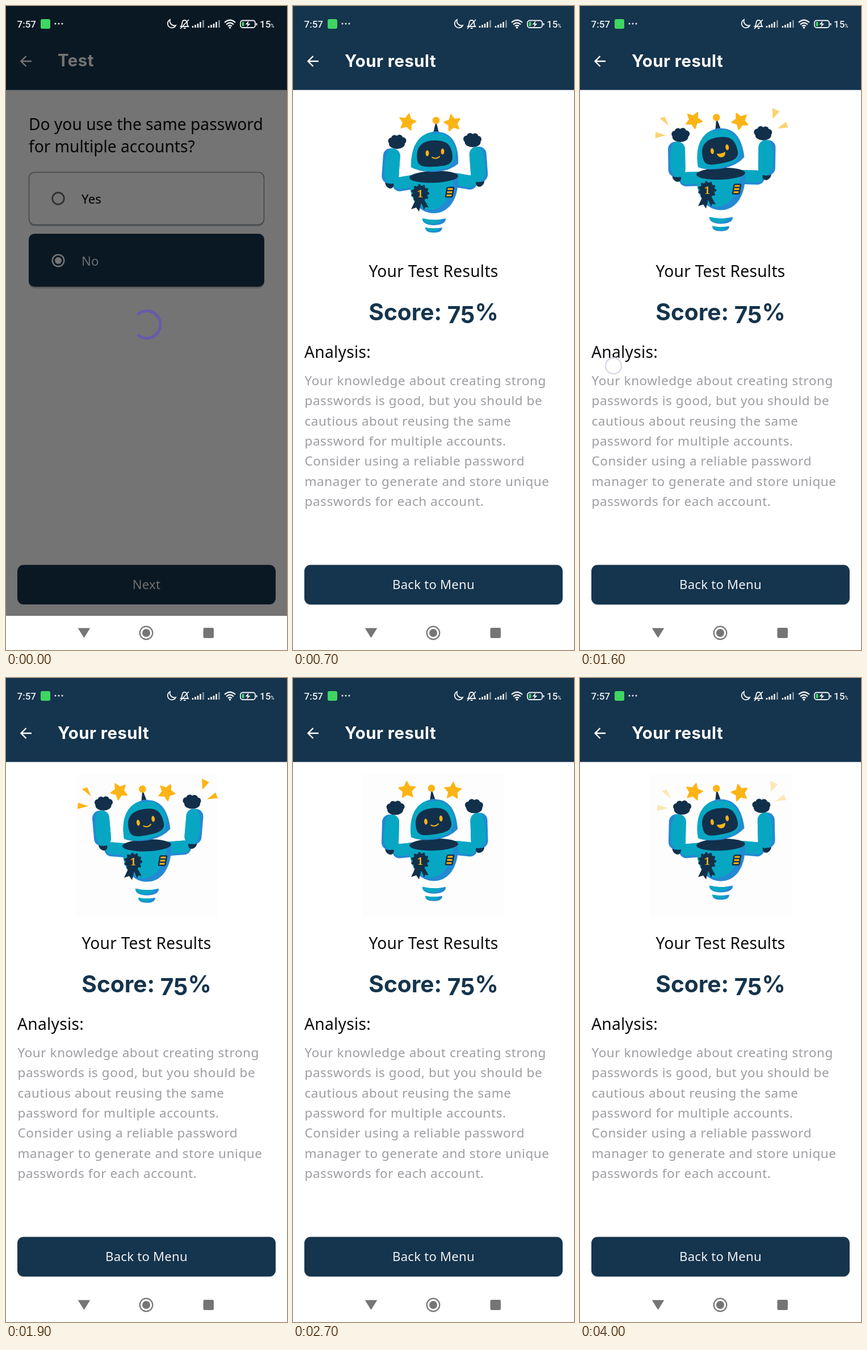
Write an HTML page that moves like this. It is 495x1131 px and loops after 4100 ms.

```html
<!DOCTYPE html>
<html lang="en">
<head>
<meta charset="utf-8">
<title>Test result</title>
<style>
  html, body { margin: 0; width: 100%; height: 100%; overflow: hidden; background: #fff; }
  svg { display: block; width: 495px; height: 1131px; }
  text { font-family: "Noto Sans", sans-serif; white-space: pre; }
  .title { font: 700 29.3px Inter, sans-serif; letter-spacing: .5px; fill: #fff; }
  .score { font: 700 40.7px Inter, sans-serif; fill: #15344d; }
  .head { font-size: 28.2px; fill: #0b0b0b; }
  .wide { letter-spacing: .25px; }
  .body { font-size: 22.5px; letter-spacing: .56px; fill: #9d9da3; }
  .label { font-size: 22.2px; letter-spacing: .2px; }
  .clock { font: 500 17px Roboto, sans-serif; fill: #eef1f3; }
  .mid { text-anchor: middle; }
  .navy { fill: #15344d; }
  .ink { fill: #12304b; }
  .cyan { fill: #07a7c3; }
  .blue { fill: #2389d3; }
  .gold { fill: #fcb415; }
</style>
</head>
<body>
<svg viewBox="0 0 495 1131">
  <defs>
    <clipPath id="screen"><rect width="495" height="1071"/></clipPath>
    <g id="back" fill="none" stroke="#fff" stroke-width="2.4">
      <path d="M45 97H27M35.5 88L26.5 97L35.5 106"/>
    </g>
    <path id="star" class="gold" stroke="#fcb415" stroke-width="2" stroke-linejoin="round"/>
    <g id="bars" stroke-width="2.6">
      <path d="M1 38v-3M5.5 38v-5M10 38v-7M14.5 38v-10" stroke="#eef1f3"/>
      <path d="M19.5 38v-13" stroke="#8796a3"/>
    </g>
    <g id="arm">
      <path class="upLow" stroke="#2389d3" stroke-width="25" stroke-linecap="round"/>
      <path class="upTop" stroke="#07a7c3" stroke-width="21" stroke-linecap="round"/>
      <g class="fore">
        <ellipse class="ink" cx="172" cy="312" rx="7" ry="9" transform="rotate(-35 172 312)"/>
        <rect class="blue" x="157.5" y="250" width="30" height="62" rx="13"/>
        <path class="cyan" d="M170 250Q187.500 249 187.500 265V297Q187.500 312 174 312Q162 310 161.500 290Q161 258 170 250Z"/>
      </g>
      <g class="hand ink">
        <ellipse cx="183" cy="242" rx="14" ry="9"/>
        <circle cx="173.5" cy="237" r="6"/><circle cx="179" cy="232.5" r="6"/>
        <circle cx="187.5" cy="232" r="6"/><circle cx="193.5" cy="236.5" r="6"/>
      </g>
    </g>
  </defs>

  <rect width="495" height="1131" fill="#fff"/>

  <g clip-path="url(#screen)">
    <g id="quiz">
      <rect width="495" height="1071" fill="#fff"/>
      <rect class="navy" width="495" height="147.5"/>
      <use href="#back"/>
      <text class="title" x="91" y="106">Test</text>
      <text class="head" x="40" y="218">Do you use the same password</text>
      <text class="head" x="40" y="257">for multiple accounts?</text>
      <rect x="40" y="294" width="415" height="93" rx="11" fill="#c9cdd1"/>
      <rect x="40.5" y="292" width="414" height="92" rx="10" fill="#fff" stroke="#96a1aa" stroke-width="1.6"/>
      <circle cx="92" cy="338" r="10.3" fill="none" stroke="#6d6d6d" stroke-width="2.8"/>
      <text class="label" x="133" y="347">Yes</text>
      <rect x="40" y="403" width="415" height="93" rx="11" fill="#c9cdd1"/>
      <rect class="navy" x="40" y="400" width="415" height="93" rx="10"/>
      <circle cx="92" cy="447" r="10.3" fill="none" stroke="#fff" stroke-width="2.4"/>
      <circle cx="92" cy="447" r="6" fill="#fff"/>
      <text class="label" x="133" y="456" fill="#f1f3f5">No</text>
      <rect class="navy" x="20" y="981.5" width="455" height="69.5" rx="11"/>
      <text class="label mid" x="247.5" y="1024" fill="#f1f3f5">Next</text>
    </g>
    <rect id="dim" width="495" height="1071" opacity=".545"/>
    <path id="spin" fill="none" stroke="#665ca8" stroke-width="5.2"/>

    <g id="result">
      <rect width="495" height="1071" fill="#fff"/>
      <rect class="navy" width="495" height="147.5"/>
      <use href="#back"/>
      <text class="title" x="91" y="106.5">Your result</text>
      <text class="head wide mid" x="247.5" y="476">Your Test Results</text>
      <text class="score mid" x="247.5" y="552">Score: <tspan dy="5">75</tspan><tspan dy="-5">%</tspan></text>
      <text class="head wide" x="20" y="617.5">Analysis:</text>
      <g id="lines"></g>
      <rect x="20" y="983.5" width="455" height="69" rx="11" fill="#cdd2d6"/>
      <rect class="navy" x="20" y="981.5" width="455" height="69.5" rx="11"/>
      <text class="label mid" x="247.5" y="1024" fill="#eef1f3">Back to Menu</text>
    </g>

    <g id="robot">
      <rect id="card" x="122" y="168" width="251" height="252" fill="#fdfdfd"/>
      <g id="rayL" class="gold"><path d="M134 195L143 192L150 208ZM127 219L145 225L126 230Z"/></g>
      <g id="rayR" class="gold"><path d="M345 177L358 183L346 196ZM369 201L373 211L354 213Z"/></g>
      <use id="starL" href="#star"/>
      <use id="starR" href="#star"/>
      <use href="#arm"/>
      <use href="#arm" transform="translate(499.5 -3) scale(-1 1)"/>
      <g id="springs">
        <path class="blue" d="M228 373Q248 378 269 373Q270 384 248 385Q227 384 228 373Z"/>
        <path class="cyan" d="M228 373Q245 377 261 375Q260 382 243 383Q229 381 228 373Z"/>
        <path class="blue" d="M233 389Q248 392 263 389Q263 398 248 398Q233 398 233 389Z"/>
        <path class="cyan" d="M233 389Q246 392 257 390Q256 396 245 396Q234 395 233 389Z"/>
      </g>
      <g id="torso">
        <path class="blue" d="M205 300C204 343 224 364 248 364S292 343 291 300Z"/>
        <path class="cyan" d="M205 300C204 339 221 357 243 358Q276 354 283 304Z"/>
        <ellipse class="ink" cx="248" cy="300" rx="43" ry="10.5" transform="rotate(-2 248 300)"/>
        <path class="ink" d="M217 338L208 357L217 354L222 361L226 346L231 358L233 353L239 354L230 338Z"/>
        <circle class="ink" cx="224" cy="329" r="13.5"/>
        <circle cx="224" cy="329" r="14" fill="none" stroke="#12304b" stroke-width="4.5" stroke-dasharray="0 8" stroke-linecap="round"/>
        <text class="gold mid" x="224" y="335.5" style="font: 700 18px 'Noto Serif', serif">1</text>
        <g transform="translate(276 327) skewX(-10)">
          <rect class="ink" x="-7" y="-9.5" width="14" height="19" rx="2.5"/>
          <path d="M-4.5 -5.5H4.5M-4.5 0H4.5M-4.5 5.5H4.5" stroke="#fcb415" stroke-width="3"/>
        </g>
      </g>
      <g id="head">
        <path class="ink" d="M247 223L251 206H253L257 223Z"/>
        <circle class="gold" cx="252" cy="201" r="6.3"/>
        <path class="blue" d="M208 283C207 249 221 221 252 221S292 247 291 277Q272 293 240 291Q220 290 208 283Z"/>
        <path class="cyan" d="M208 283C207 249 221 221 252 221Q279 225 286 252Q289 274 272 284Q250 291 230 289Q216 287 208 283Z"/>
        <path class="blue" d="M241 224Q252 216 263 224Z"/>
        <path class="ink" d="M219 271C215 247 228 236 249 236S279 242 281 264C282 279 268 281 251 282S221 283 219 271Z"/>
        <ellipse class="gold" cx="236.5" cy="258.5" rx="2.9" ry="5.2"/>
        <ellipse class="gold" cx="263.5" cy="255.5" rx="2.9" ry="5.2"/>
        <path id="smile" d="M245 265.5Q252 270 258 264.5" fill="none" stroke="#fcb415" stroke-width="2" stroke-linecap="round"/>
        <path id="grin" class="gold" d="M243.5 264Q252 266 259 262.5Q258.5 271.5 252 271.5Q245.5 271.5 243.5 264Z"/>
      </g>
    </g>
    <circle id="touch" cx="59" cy="632" r="14" fill="#fff" fill-opacity=".65" stroke="#d9d9e8" stroke-width="2.4"/>
  </g>

  <g id="status">
    <text class="clock" x="19.5" y="38">7:57</text>
    <rect x="61" y="23" width="17" height="17" rx="3" fill="#3fd661"/>
    <g fill="#eef1f3"><circle cx="87" cy="31" r="1.5"/><circle cx="93" cy="31" r="1.5"/><circle cx="99" cy="31" r="1.5"/></g>
    <g fill="none" stroke="#eef1f3" stroke-width="1.8">
      <path d="M289 24A7.5 7.5 0 1 0 299 34A8 8 0 0 1 289 24Z"/>
      <path d="M308 36H321Q319 34 319 29Q318 25 314.5 25Q311 25 310.5 29Q310 34 308 36ZM313 39H316.5M307 40L322 24"/>
      <path d="M385 29Q394.5 20.5 404 29M388 32.5Q394.5 26.5 401 32.5M391 35.5Q394.5 32.5 398 35.5" stroke-width="2.2"/>
      <rect x="413" y="25.5" width="26" height="12.5" rx="4"/>
      <path d="M441.5 30V34" stroke-width="2"/>
    </g>
    <circle cx="394.5" cy="38" r="1.8" fill="#eef1f3"/>
    <rect x="415.5" y="28" width="4" height="7.5" rx="1" fill="#42d25f"/>
    <path d="M427.5 26L421.5 32.5H425.5L424 37.5L430.5 31H426.5Z" fill="#eef1f3"/>
    <use href="#bars" x="328"/><use href="#bars" x="356"/>
    <text class="clock" x="447" y="38">15<tspan font-size="8.5">%</tspan></text>
  </g>

  <g fill="#757575">
    <path d="M127.5 1093H147.5L137.5 1109Z" stroke="#757575" stroke-linejoin="round"/>
    <circle cx="247" cy="1101" r="11.3" fill="none" stroke="#757575" stroke-width="2.2"/>
    <circle cx="247" cy="1101" r="7"/>
    <rect x="347.5" y="1092" width="18.5" height="18" rx="2.5"/>
  </g>
</svg>
<script>
const LOOP = 4100, STEP = 100;
const $ = id => document.getElementById(id);
const set = (el, attrs) => { for (const k in attrs) el.setAttribute(k, attrs[k]); };
const each = (cls, attrs) => document.querySelectorAll(cls).forEach(el => set(el, attrs));
const show = (id, on) => set($(id), { visibility: on ? 'visible' : 'hidden' });

// Linear interpolation through [time, value] pairs
function key(t, ...pts) {
  if (t <= pts[0][0]) return pts[0][1];
  for (let i = 1; i < pts.length; i++) {
    const [t0, a] = pts[i - 1], [t1, b] = pts[i];
    if (t <= t1) return a + (b - a) * (t - t0) / (t1 - t0);
  }
  return pts[pts.length - 1][1];
}

const zoom = s => `translate(247.5 535.5) scale(${s}) translate(-247.5 -535.5)`;
const move = (x, y) => `translate(${x} ${y})`;

$('lines').innerHTML = [
  'Your knowledge about creating strong',
  'passwords is good, but you should be',
  'cautious about reusing the same',
  'password for multiple accounts.',
  'Consider using a reliable password',
  'manager to generate and store unique',
  'passwords for each account.'
].map((s, i) => `<text class="body" x="20.5" y="${666 + i * 35.35}">${s}</text>`).join('');

const starPts = Array.from({ length: 10 }, (_, i) => {
  const r = i % 2 ? 7.5 : 15, a = i * Math.PI / 5;
  return `${(r * Math.sin(a)).toFixed(2)} ${(-r * Math.cos(a)).toFixed(2)}`;
});
set($('star'), { d: `M${starPts.join('L')}Z` });

function drawPages(t) {
  const p = key(t, [200, 0], [300, .4], [400, .76], [500, .94], [600, 1]);
  set($('quiz'), { transform: zoom(1 + .05 * p) });
  set($('result'), { transform: zoom(.85 + .15 * p), opacity: key(t, [200, 0], [300, .6], [400, 1]) });
  const g = Math.round(key(t, [200, 0], [400, 128]));
  set($('dim'), { fill: `rgb(${g},${g},${g + g / 32})` });

  const turn = t / 100 * .9, from = -2.35 + turn, to = 2.3 + turn;
  const at = a => `${248 + 24 * Math.cos(a)} ${559.5 + 24 * Math.sin(a)}`;
  set($('spin'), {
    d: `M${at(from)}A24 24 0 1 1 ${at(to)}`,
    opacity: key(t, [100, 1], [200, .7], [300, 0])
  });
}

function drawRobot(t) {
  const arm = key(t, [1350, 0], [1600, .55], [1850, 1], [2400, 1], [2800, 0], [3800, 0], [4000, .3]);
  const lift = key(t, [700, 0], [1600, -5.5], [2300, -7], [3200, -8], [4000, -7.3]);
  const tilt = key(t, [1100, 0], [1450, -8], [2500, -8], [2900, -3], [3600, -3], [3850, -8]);
  const coil = key(t, [700, 0], [1600, -2.5], [2300, -4], [3200, -9], [4000, -8.5]);
  const starY = key(t, [700, 204], [1600, 200.5], [2300, 197], [3200, 196.5], [4000, 200]);
  const spin = key(t, [700, 12], [1600, 27], [2300, 66], [3200, 72], [4000, 86]);
  const ray = key(t, [1500, 0], [1600, .6], [1700, 1], [2400, 1], [2600, 0], [3900, 0], [4000, .32]);
  const grin = t >= 1000 && t < 1900 || t >= 2900;

  set($('torso'), { transform: move(0, lift) });
  set($('springs'), { transform: move(0, coil) });
  set($('head'), { transform: `${move(0, lift)} rotate(${tilt} 248 285)` });
  show('grin', grin);
  show('smile', !grin);

  const ex = 188 - 2 * arm, ey = 313 + lift - 6 * arm, sy = 309 + lift;
  each('.upLow', { d: `M${ex} ${ey}L212 ${sy}` });
  each('.upTop', { d: `M${ex} ${ey - 2}L212 ${sy - 2}` });
  each('.fore', { transform: `${move(-4 * arm, lift - 11 * arm)} rotate(${4 - 9 * arm} 172 281)` });
  each('.hand', { transform: move(-11.5 * arm, lift - 12 * arm) });

  set($('starL'), { transform: `${move(201.5 - 2 * arm, starY)} rotate(${spin})` });
  set($('starR'), { transform: `${move(281 + 2 * arm, starY + 1.5)} rotate(${-spin})` });
  const inset = 14 * (1 - arm), drop = 5 * (1 - arm);
  set($('rayL'), { transform: move(inset, drop), opacity: ray });
  set($('rayR'), { transform: move(-inset, drop), opacity: ray });
  show('card', t >= 1700);
}

function frame(now) {
  const t = Math.floor(now % LOOP / STEP) * STEP;
  drawPages(t);
  drawRobot(t);
  set($('robot'), { display: t >= 600 ? 'inline' : 'none' });
  set($('touch'), { opacity: key(t, [1400, 0], [1500, .8], [1600, 1], [1700, 0]) });
  requestAnimationFrame(() => frame(performance.now() - start));
}
const start = performance.now();
frame(0);
</script>
</body>
</html>
```
